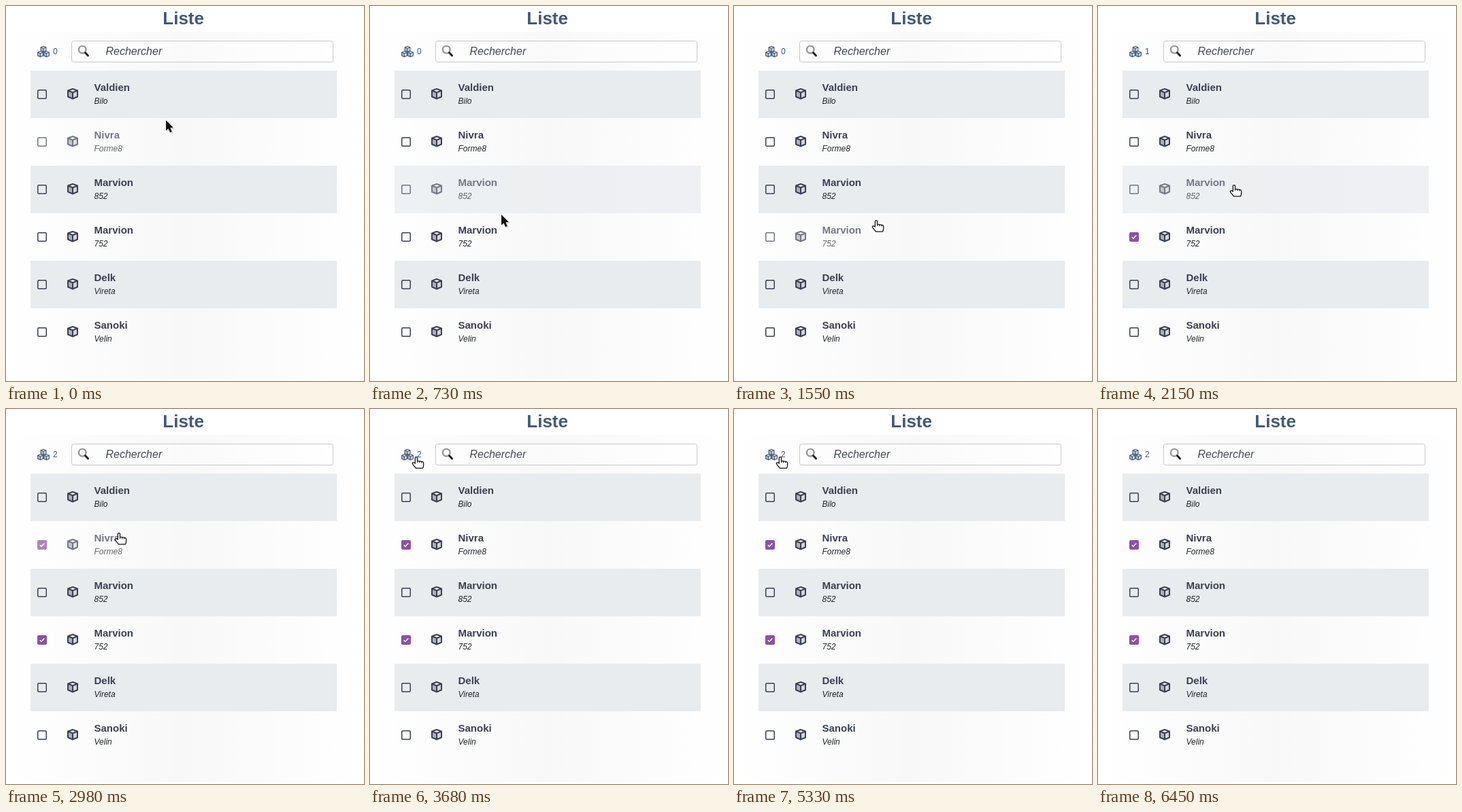
Animation of 526x552 px, one loop 7.16 s. Source, as an HTML page:

```html
<!DOCTYPE html>
<html lang="fr">
<head>
<meta charset="utf-8">
<title>Liste</title>
<style>
html, body { margin: 0; width: 100%; height: 100%; overflow: hidden; background: #fff; }
svg { display: block; font-family: "Liberation Sans", Arial, sans-serif; }
.title { font: bold 26px "Liberation Sans", Arial, sans-serif; fill: #42597a; }
.name { font-weight: bold; font-size: 15px; fill: #3b3f51; }
.model { font-style: italic; font-size: 12px; fill: #212529; }
.search { font-style: italic; font-size: 16px; fill: #444a55; }
.count { font-size: 12px; }
</style>
</head>
<body>
<svg width="526" height="552" viewBox="0 0 526 552">
  <defs>
    <linearGradient id="shade">
      <stop offset="0" stop-color="#fff"/>
      <stop offset=".5" stop-color="#f8f8f8"/>
      <stop offset="1" stop-color="#fff"/>
    </linearGradient>
    <g id="cube" stroke-linejoin="round">
      <path d="M-7-4.5L0-7L7-4.5V4.5L0 7.5L-7 4.5Z" fill="#fafafa"/>
      <path d="M-7-4.5L0-1.8V7.5L-7 4.5Z" fill="currentColor" fill-opacity=".4"/>
      <path d="M7-4.5L0-1.8V7.5L7 4.5Z" fill="currentColor" fill-opacity=".2"/>
      <path d="M-7-4.5L0-7L7-4.5V4.5L0 7.5L-7 4.5ZL0-1.8L7-4.5M0-1.8V7.5" fill="none" stroke="currentColor" stroke-width="2"/>
    </g>
    <g id="cubes">
      <use href="#cube" transform="translate(55 63.2) scale(.56)"/>
      <use href="#cube" transform="translate(50.5 70.7) scale(.56)"/>
      <use href="#cube" transform="translate(59.5 70.7) scale(.56)"/>
    </g>
  </defs>
  <rect y="38" width="526" height="511" fill="url(#shade)"/>
  <text class="title" x="230.3" y="27">Liste</text>
  <rect x="96.5" y="51.5" width="384" height="31" rx="3" fill="#fff" fill-opacity=".3" stroke="#c8c8c8"/>
  <circle cx="112.2" cy="64.2" r="5.3" fill="none" stroke="#999" stroke-width="2.4"/>
  <path d="M116.5 68.8L120.5 73" stroke="#222" stroke-width="3" stroke-linecap="round"/>
  <text class="search" x="146.5" y="72">Rechercher</text>
  <g id="scene"></g>
  <g id="cursor">
    <g id="arrow">
      <path d="M1.5 1.5V17L5 14L7.5 20L10.3 18.8L7.8 13H12.5Z" fill="#000" opacity=".15"/>
      <path d="M0 0V15.5L3.5 12.4L6 18.3L8.8 17.1L6.3 11.3H11Z" fill="#111" stroke="#fff" stroke-width="1" paint-order="stroke"/>
    </g>
    <g id="hand" fill="#fff" stroke="#111" stroke-width="1.3" stroke-linejoin="round">
      <path d="M-1.7 10V2Q-1.7 .6 0 .6Q1.5 .6 1.5 2V6.4L8.7 7.4Q10.6 7.9 10.6 9.8V12.5Q10.6 15 9.4 17.2H-.5L-5 11.6Q-6.4 9.6-5 8.9Q-3.5 8.5-1.7 10Z"/>
      <path d="M1.5 6.4V9M4.6 7V9.3M7.6 7.4V9.6" fill="none" stroke-width="1"/>
    </g>
  </g>
</svg>
<script>
const LOOP = 7160, LAG = 30, TOP = 95, ROW = 70;
const $ = id => document.getElementById(id);

const cars = [
  ["Valdien", "Bilo"], ["Nivra", "Forme8"], ["Marvion", "852"],
  ["Marvion", "752"], ["Delk", "Vireta"], ["Sanoki", "Velin"]
];

const linear = u => u;
const smooth = u => u * u * (3 - 2 * u);
const easeOut = u => 1 - (1 - u) ** 2;

// Pointer stops: time, x, y, easing towards the stop
const path = [
  [0, 235, 168], [285, 235, 168], [730, 193, 307], [980, 176, 390], [1000, 176, 390],
  [1550, 209, 315, smooth], [1930, 209, 315], [2380, 190, 209, smooth],
  [2978, 190, 209], [2980, 166, 182], [3680, 68, 70, easeOut],
  [6100, 68, 70], [6450, 57, 26]
];

function pointer(t) {
  const i = path.findIndex(p => p[0] > t);
  if (i < 0) return path.at(-1).slice(1, 3);
  if (i === 0) return path[0].slice(1, 3);
  const [t0, x0, y0] = path[i - 1], [t1, x1, y1, ease = linear] = path[i];
  const u = ease((t - t0) / (t1 - t0));
  return [x0 + (x1 - x0) * u, y0 + (y1 - y0) * u];
}

const checkbox = on => on
  ? `<rect x="46" y="28" width="14" height="14" rx="2" fill="#8e4fa8"/>
     <path d="M49.8 35.2L52 37.4L56.3 32.8" fill="none" stroke="#fff" stroke-width="1.6"/>`
  : `<rect x="46.75" y="28.75" width="12.5" height="12.5" rx="1.5" fill="none" stroke="#3b3f51" stroke-width="1.5"/>`;

const row = ([name, model], i, checked, hovered) => `
  <g transform="translate(0 ${TOP + i * ROW})" opacity="${hovered ? .7 : 1}">
    ${i % 2 ? "" : `<rect x="36" width="450" height="${ROW}" fill="#e8ecef"/>`}
    ${checkbox(checked)}
    <use href="#cube" x="98" y="34" color="#3b3f51"/>
    <text class="name" x="129.5" y="30">${name}</text>
    <text class="model" x="129.5" y="49">${model}</text>
  </g>`;

function scene(picked, filtered, hover) {
  const color = filtered ? "#9c4fb0" : "#42597a";
  const shown = filtered ? picked : cars.map((_, i) => i);
  return `
    ${filtered ? `<rect x="36" y="49" width="50" height="36" fill="#ece8f4"/>` : ""}
    <use href="#cubes" color="${color}"/>
    <text class="count" x="69" y="71" fill="${color}">${picked.length}</text>
    ${shown.map((car, i) => row(cars[car], i, picked.includes(car), i === hover)).join("")}`;
}

function isHand(x, y) {
  return y < TOP ? x > 36 && x < 86 && y > 49 && y < 85 : (y - TOP) % ROW >= 5;
}

let last = "";
function draw() {
  const t = performance.now() % LOOP;
  const picked = [[3, 1730], [1, 2600]].filter(p => t >= p[1]).map(p => p[0]);
  const filtered = t >= 4200 && t < 5330;
  const visible = t < 6450;
  const hover = visible ? Math.floor((pointer(t - LAG)[1] - TOP) / ROW) : -1;

  const html = scene(picked, filtered, hover);
  if (html !== last) $("scene").innerHTML = last = html;

  const [x, y] = pointer(t), hand = isHand(x, y);
  $("cursor").setAttribute("transform", `translate(${Math.round(x)} ${Math.round(y)})`);
  $("hand").style.display = visible && hand ? "" : "none";
  $("arrow").style.display = visible && !hand ? "" : "none";
  requestAnimationFrame(draw);
}
draw();
</script>
</body>
</html>
```
